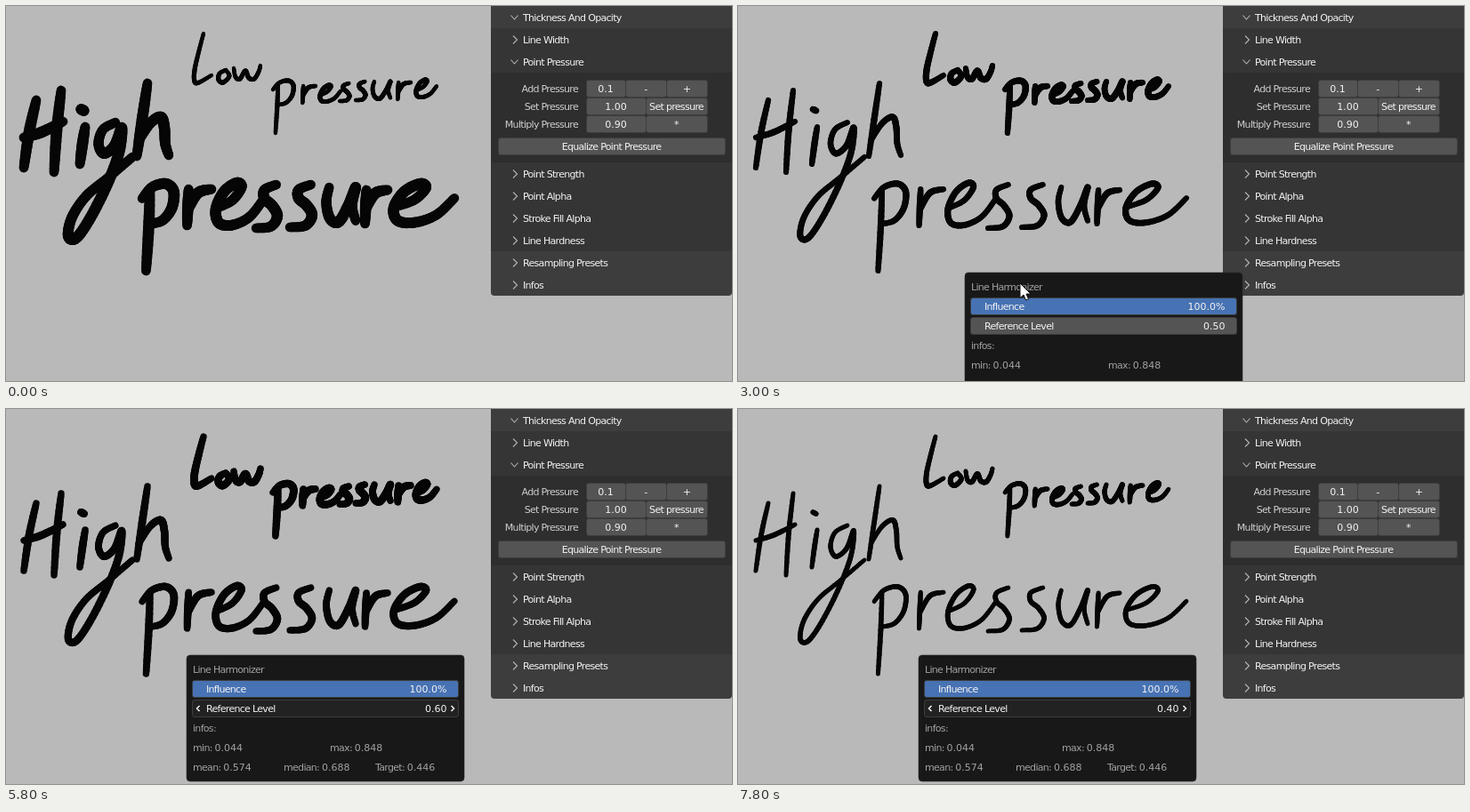
Animation, 816 px wide and 422 px high, one loop 8 s. Source, as an HTML page with a canvas:

```html
<!DOCTYPE html>
<html lang="en">
<head>
<meta charset="utf-8">
<title>Equalize point pressure</title>
<style>
html, body { margin: 0; width: 100%; height: 100%; overflow: hidden; background: #b9b9b9; }
canvas, svg { position: absolute; left: 0; top: 0; width: 816px; height: 422px; }
text { font: 11px "DejaVu Sans", sans-serif; letter-spacing: -.69px; fill: #f4f4f4; white-space: pre; }
.num { letter-spacing: 0; }
.label { fill: #cfcfcf; }
.dim { fill: #a2a2a2; }
.mid { text-anchor: middle; }
.end { text-anchor: end; }
.chevron { fill: none; stroke: #b4b4b4; stroke-width: 1.1; }
.cell { stroke: #3d3d3d; }
</style>
</head>
<body>
<canvas width="816" height="422"></canvas>
<svg viewBox="0 0 816 422"></svg>
<script>
const LOOP = 8000;
const svg = document.querySelector('svg');
const ctx = document.querySelector('canvas').getContext('2d');

// Handwriting: letters live in a 100 x 100 box, one string per pen stroke.
const glyphs = {
  p: ['24 6 20 50 12 100', '0 17 30 4 72 0 96 9 90 28 62 42 26 46'],
  r: ['8 5 5 50 2 100', '5 60 45 15 100 5'],
  e: ['2 58 34 40 53 10 43 0 17 20 0 60 6 92 34 97 70 78 100 36'],
  s: ['95 0 40 12 40 32 75 48 100 72 70 96 0 100'],
  u: ['10 0 0 40 12 85 42 95 75 50 100 0 88 50 100 92']
};
const bigPressure = [
  ['p', 153, 200, 37, 98], ['r', 203, 204, 28, 43], ['e', 236, 199, 54, 49], ['s', 281, 201, 24, 49],
  ['s', 319, 201, 25, 48], ['u', 360, 204, 33, 41], ['r', 403, 205, 26, 40], ['e', 436, 200, 68, 45]
];
const smallPressure = [
  ['p', 300, 84, 24, 59], ['r', 333, 89, 15, 20], ['e', 353, 89, 23, 19], ['s', 375, 87, 11, 20],
  ['s', 393, 85, 11, 21], ['u', 412, 85, 20, 20], ['r', 440, 85, 15, 20], ['e', 461, 83, 23, 20]
];
const high = [
  '34 106 26 142 20 182', '62 95 57 140 54 187', '20 148 40 142 64 130',
  '84 116 88 118', '89 136 86 155 83 178',
  '123 131 109 139 104 155 110 166 122 157 130 137 127 165 114 200 95 238 79 261 70 259 74 238 90 214 115 193 142 170',
  '159 87 153 128 147 169', '149 152 162 132 174 125 178 137 179 155 183 168'
];
const low = [
  '222 31 217 50 212 72 212 85 217 86 231 78',
  '247 72 240 76 239 83 244 86 251 79 247 72',
  '256 70 258 80 263 82 269 73 273 81 279 82 284 74 286 67'
];

function points(text, x = 0, y = 0, w = 100, h = 100) {
  const n = text.split(' ').map(Number), list = [];
  for (let i = 0; i < n.length; i += 2) list.push([x + n[i] * w / 100, y + n[i + 1] * h / 100]);
  return list;
}

// Catmull-Rom sampling of a stroke.
function smooth(p) {
  const out = [p[0]], steps = 8;
  for (let i = 0; i < p.length - 1; i++) {
    const a = p[i - 1] || p[i], b = p[i], c = p[i + 1], d = p[i + 2] || c;
    for (let k = 1; k <= steps; k++) {
      const t = k / steps;
      out.push([0, 1].map(j => b[j] + .5 * t * (c[j] - a[j] +
        t * (2 * a[j] - 5 * b[j] + 4 * c[j] - d[j] + t * (3 * (b[j] - c[j]) + d[j] - a[j])))));
    }
  }
  return out;
}

const word = places => places.flatMap(([g, ...box]) => glyphs[g].map(s => smooth(points(s, ...box))));
const plain = strokes => strokes.map(s => smooth(points(s)));
const ink = [
  { width: 12.6, strokes: [...plain(high), ...word(bigPressure)] },
  { width: 5.2, strokes: [...plain(low), ...word(smallPressure)] }
];

function drawInk(level) {
  ctx.clearRect(0, 0, 816, 422);
  ctx.lineCap = 'round';
  ctx.strokeStyle = level !== null && level < .03 ? '#333' : '#060606';
  for (const { width, strokes } of ink) {
    const full = level === null ? width : Math.max(1.1, level * 14.5);
    for (const s of strokes) for (let i = 1; i < s.length; i++) {
      ctx.lineWidth = full * (.82 + .18 * Math.sin(Math.PI * i / s.length));
      ctx.beginPath();
      ctx.moveTo(...s[i - 1]);
      ctx.lineTo(...s[i]);
      ctx.stroke();
    }
  }
}

// Interface
const label = (x, y, s, cls = '', id = '') =>
  `<text x="${x}" y="${y}" class="${cls}" id="${id}">${s.replace(/[\d.]+%?/g, '<tspan class="num">$&</tspan>')}</text>`;
const rect = (x, y, w, h, fill, rx = 0, extra = '') =>
  `<rect x="${x}" y="${y}" width="${w}" height="${h}" fill="${fill}" rx="${rx}" ${extra}/>`;
const cell = (x, y, w, h, fill, id = '') => rect(x, y, w, h, fill, 2.5, `class="cell" id="${id}"`);
const chevron = (y, open) => `<path class="chevron" d="${open
  ? `M567.5 ${y - 2.5}l4 4.5 4-4.5` : `M570 ${y - 4.5}l4.5 4.5-4.5 4.5`}"/>`;

const sections = [
  ['Thickness And Opacity', 13, true], ['Line Width', 38], ['Point Pressure', 63, true],
  ['Point Strength', 189], ['Point Alpha', 214], ['Stroke Fill Alpha', 239],
  ['Line Hardness', 264], ['Resampling Presets', 289], ['Infos', 314]
];
const rows = [
  ['Add Pressure', 93, [[652.5, 696.5, '0.1'], [696.5, 742.5, '-'], [742.5, 788.5, '+']]],
  ['Set Pressure', 113, [[652.5, 719.5, '1.00'], [719.5, 788.5, 'Set pressure']]],
  ['Multiply Pressure', 133, [[652.5, 719.5, '0.90'], [719.5, 788.5, '*']]]
];

const panel = rect(545, -10, 271, 336, '#3d3d3d', 4) +
  rect(545, 25, 271, 251, '#353535') + rect(545, 75, 271, 101, '#2e2e2e') +
  sections.map(([name, y, open]) => chevron(y, open) + label(581, y + 4, name)).join('') +
  rows.map(([name, y, cells]) => label(643, y + 4, name, 'label end') +
    cells.map(([x1, x2, s]) => cell(x1, y - 9.5, x2 - x1, 19, '#545454') +
      label((x1 + x2) / 2 - .5, y + 4, s, 'mid')).join('')).join('') +
  cell(553.5, 148.5, 255, 19, '#545454', 'button') +
  label(680.5, 162, 'Equalize Point Pressure', 'mid');

const popup = `<g id="popup">` +
  rect(0, 0, 312, 142, '#181818', 4, 'stroke="#2a2a2a" stroke-width=".6"') +
  label(7, 20, 'Line Harmonizer', 'dim') +
  cell(6.5, 28.5, 299, 19, '#4772b3') +
  label(22, 42, 'Influence') + label(292.5, 42, '100.0%', 'end') +
  cell(6.5, 50.5, 299, 19, '#545454', 'field') +
  label(22, 64, 'Reference Level') + label(292.5, 64, '0.50', 'end num', 'level') +
  `<path id="arrows" fill="none" stroke="#fff" stroke-width="1.4" d="M14.5 57l-3 3 3 3M297.500 57l3 3-3 3"/>` +
  label(7, 86, 'infos:', 'dim') +
  label(7, 108, 'min: 0.044', 'dim') + label(161, 108, 'max: 0.848', 'dim') +
  label(7, 130, 'mean: 0.574', 'dim') + label(109, 130, 'median: 0.688', 'dim') +
  label(212, 130, 'Target: 0.446', 'dim') + '</g>';

svg.innerHTML = panel + popup +
  '<path id="cursor" fill="#fff" stroke="#111" d="M0 0V16.500L4 13 6.500 19 9.500 17.700 7 12H12Z"/>';

const el = id => document.getElementById(id);
const parts = Object.fromEntries(['button', 'popup', 'field', 'level', 'arrows', 'cursor'].map(id => [id, el(id)]));
const levelNumber = parts.level.querySelector('tspan');

// Each step changes only the values it names.
const steps = [
  [0, { cursor: null, button: '#545454', popup: null, field: '#545454', level: null, edit: false }],
  [1200, { cursor: [652, 286] }],
  [1400, { cursor: [700, 214] }],
  [1600, { cursor: [727, 164], button: '#656565' }],
  [1800, { cursor: [727, 161], button: '#4772b3' }],
  [2000, { button: '#545454', popup: [391, 310], level: .5 }],
  [2200, { cursor: [600, 294] }],
  [2400, { cursor: [480, 320] }],
  [2600, { cursor: [453, 322] }],
  [2800, { cursor: [362, 316], popup: [300, 304] }],
  [3000, { cursor: [317, 312], popup: [255, 300] }],
  [3200, { cursor: [277, 294], popup: [215, 282] }],
  [3400, { cursor: [265, 289], popup: [203, 277] }],
  [3600, { cursor: [292, 296] }],
  [3800, { cursor: [368, 314] }],
  [4000, { cursor: [423, 325] }],
  [4200, { cursor: [432, 333], field: '#656565' }],
  [4400, { cursor: [434, 336] }],
  [4600, { cursor: null, field: '#222', edit: true }],
  [4800, { level: .52 }],
  [5000, { level: .54 }],
  [5200, { level: .74 }],
  [5400, { level: .9 }],
  [5800, { level: .6 }],
  [6000, { level: .2 }],
  [6200, { level: 0 }],
  [6800, { level: .04 }],
  [7000, { level: .12 }],
  [7200, { level: .22 }],
  [7400, { level: .31 }],
  [7600, { level: .37 }],
  [7800, { level: .4 }]
];

function place(node, at) {
  node.style.display = at ? '' : 'none';
  if (at) node.setAttribute('transform', `translate(${at})`);
}

let shown = -1, inkLevel;
function frame(now) {
  const time = now % LOOP;
  const past = steps.filter(([t]) => t <= time);
  if (past.length !== shown) {
    shown = past.length;
    const s = Object.assign({}, ...past.map(([, change]) => change));
    place(parts.cursor, s.cursor);
    place(parts.popup, s.popup);
    parts.button.setAttribute('fill', s.button);
    parts.field.setAttribute('fill', s.field);
    parts.arrows.style.display = s.edit ? '' : 'none';
    levelNumber.textContent = (s.level ?? .5).toFixed(2);
    if (s.level !== inkLevel) drawInk(inkLevel = s.level);
  }
}

const start = performance.now();
function tick() {
  frame(performance.now() - start);
  requestAnimationFrame(tick);
}
tick();
</script>
</body>
</html>
```
